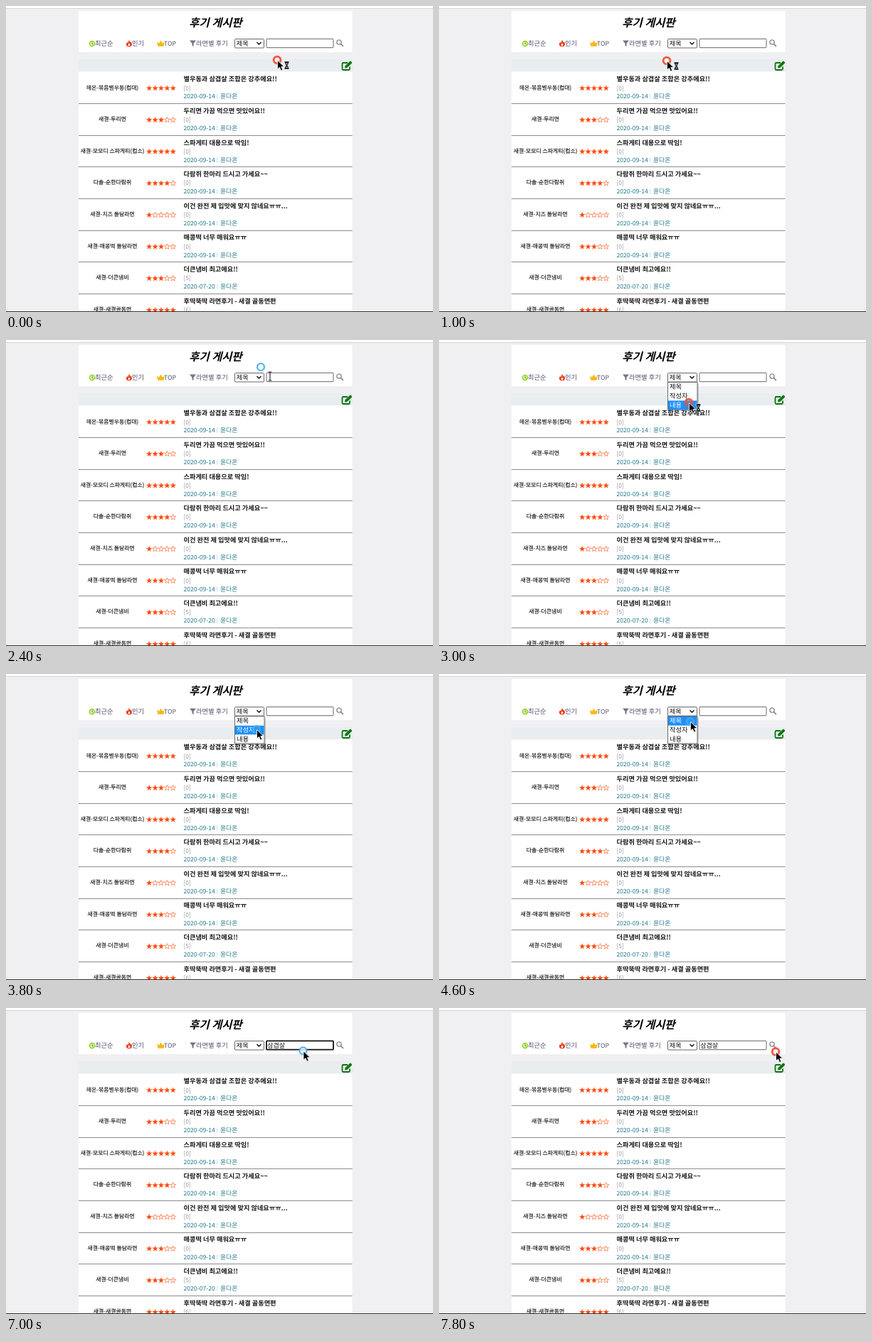
These frames come from a looping animation (600x431 px, 8 s). An HTML page:

```html
<!DOCTYPE html>
<html>
<head>
<meta charset="utf-8">
<title>후기 게시판</title>
<style>
  html, body { margin: 0; width: 100%; height: 100%; overflow: hidden; background: #f0eff1; }
  svg { display: block; width: 100%; height: 100%; }
  text { font-family: "Noto Sans CJK KR", "Noto Sans CJK", "Noto Sans", sans-serif; white-space: pre; text-rendering: geometricPrecision; }
  .subject { font-weight: 700; fill: #161616; }
  .count { fill: #999; }
  .meta { fill: #21788c; }
  .label { fill: #111; stroke: #111; stroke-width: .12; text-anchor: middle; }
  .menu { fill: #514d6e; }
  .heading { font-weight: 700; font-style: italic; fill: #000; text-anchor: middle; }
</style>
</head>
<body>
<svg id="stage" viewBox="0 0 600 431"></svg>
<script>
const LOOP = 8000, STEP = 200;
const ROW_TOP = 92.4, ROW_HEIGHT = 44.65;
const AUTHOR = '윤다온';

// label, stars, subject, replies, date
const reviews = [
  ['해온-볶음별우동(컵대)', 5, '별우동과 삼겹살 조합은 강추에요!!', 0, '2020-09-14'],
  ['새결-두리면', 3, '두리면 가끔 먹으면 맛있어요!!', 0, '2020-09-14'],
  ['새결-모모디 스파게티(컵소)', 5, '스파게티 대용으로 딱임!', 0, '2020-09-14'],
  ['다솔-순한다람쥐', 4, '다람쥐 한마리 드시고 가세요~~', 0, '2020-09-14'],
  ['새결-치즈 돌담라면', 1, '이건 완전 제 입맛에 맞지 않네요ㅠㅠ...', 0, '2020-09-14'],
  ['새결-매콩떡 돌담라면', 3, '매콩떡 너무 매워요ㅠㅠ', 0, '2020-09-14'],
  ['새결-더큰냄비', 3, '더큰냄비 최고에요!!', 5, '2020-07-20'],
  ['새결-새결골동면', 5, '후딱뚝딱 라면후기 - 새결 골동면편', 6, '2020-07-20']
];
const options = ['제목', '작성자', '내용'];

// Pointer hot spot: time, x, y
const path = [
  [0, 381, 76], [1000, 320, 77], [1400, 326, 71], [2000, 391, 54],
  [2200, 388, 49], [2600, 354, 53], [3000, 351, 88], [3400, 351, 88],
  [3800, 352, 78], [4600, 353, 67], [5000, 376, 56], [5200, 383, 56.5],
  [6800, 383, 56.5], [7200, 452, 64], [7400, 526, 74], [7800, 473, 61.5]
];

// Time, committed text, syllable being composed
const typing = [
  [0, '', ''], [5400, '', 'ㅅ'], [5600, '', '사'], [5800, '', '삼'], [6000, '삼', '겨'],
  [6200, '삼', '겹'], [6400, '삼겹', '사'], [6600, '삼겹', '살'], [7000, '삼겹살', '']
];

const rect = (x, y, w, h, fill, extra = '') =>
  `<rect x="${x}" y="${y}" width="${w}" height="${h}" fill="${fill}" ${extra}/>`;
const shape = (d, fill, extra = '') => `<path d="${d}" fill="${fill}" ${extra}/>`;
const text = (x, centerY, size, content, attrs) =>
  `<text x="${x}" y="${centerY + size * .37}" font-size="${size}" ${attrs}>${content}</text>`;

function star(cx, cy, filled) {
  const points = Array.from({ length: 10 }, (_, i) => {
    const radius = i % 2 ? 1.7 : 4.1, angle = (i / 5 - .5) * Math.PI;
    return `${(cx + radius * Math.cos(angle)).toFixed(2)},${(cy + radius * Math.sin(angle)).toFixed(2)}`;
  });
  return `<polygon points="${points.join(' ')}" fill="${filled ? '#ff4a0c' : 'none'}" stroke="#ff4a0c" stroke-width="${filled ? .2 : .6}"/>`;
}

function reviewRow([label, score, subject, replies, date], index) {
  const y = ROW_TOP + index * ROW_HEIGHT;
  const stars = [0, 1, 2, 3, 4].map(i => star(201.2 + i * 8.4, y + 23.4, i < score)).join('');
  return text(149.5, y + 22.2, 7.9, label, 'class="label"') + stars
    + text(249.5, y + 10.4, 9.2, subject, 'class="subject"')
    + text(249.5, y + 23, 8.4, `[${replies}]`, 'class="count"')
    + text(249.5, y + 34.8, 8.65, date, 'class="meta"')
    + rect(296.5, y + 31.5, .7, 7, '#b5ccd3')
    + text(301, y + 34.8, 8.8, AUTHOR, 'class="meta"')
    + rect(102, Math.round(y + ROW_HEIGHT), 384.5, 1, '#8d8d8d');
}

const menu = [[125, '최근순'], [177, '인기'], [222, 'TOP'], [267, '라면별 후기']]
  .map(([x, label]) => text(x, 52.5, label === 'TOP' ? 8.7 : 9.3, label, 'class="menu"')).join('');

const icons =
  '<circle cx="121" cy="53" r="3.6" fill="#d9f2a0" stroke="#86cc1c" stroke-width="1.3"/>'
  + shape('M121 50.8v2.4l1.6 1', 'none', 'stroke="#5ea30c"')
  + shape('M172.5 48c2 1.5 2 2.5 2.4 3.4l1-1c2.4 3.8.8 6.9-2.9 6.9s-5.5-3.4-2.9-6.4l.9 1.1c1-1 1.5-2.4 1.5-4z', '#ee3d16')
  + shape('M173 52.5c1.6 1.5 2 3.5 0 3.8-2-.2-1.6-2.2 0-3.8z', '#fff')
  + shape('M212 50.5l3 2 2.5-3.9 2.5 3.9 3-2-1.4 6.3h-8.2z', '#f7b916')
  + shape('M258 48.5h9l-3.5 4.2v4.3l-2-1.3v-3z', '#6d7685')
  + shape('M470.3 53.3l3.6 3.6', 'none', 'stroke="#8d8d8d" stroke-width="1.9"')
  + '<circle cx="468" cy="51" r="3.1" fill="none" stroke="#8d8d8d" stroke-width="1.4"/>'
  + shape('M480 80h-6q-1.5 0-1.5 1.5v7q0 1.5 1.5 1.5h7.5q1.5 0 1.5-1.5v-3', 'none', 'stroke="#0c750c" stroke-width="1.8"')
  + shape('M476 87.6l.6-3.3 6.4-6.4q.8-.6 1.6 0l1.2 1.2q.6.8 0 1.6l-6.5 6.4z', '#0c750c');

const dropdown = '<g id="dropdown">'
  + rect(322, 61, 43, 39, '#000', 'opacity=".15"')
  + rect(321.5, 59.5, 41.5, 38.5, '#fff', 'stroke="#666"')
  + rect(322, 60, 40.5, 12.6, '#1e90ff', 'id="highlight"')
  + options.map((label, i) => text(324, 66 + i * 12.7, 9.3, label, 'class="option"')).join('') + '</g>';

const pointer =
  '<g id="ring"><circle id="glow" r="6.6" opacity=".35"/><circle id="band" r="4.8" fill="#fff"/></g>'
  + `<g id="arrow">${shape('M0 0v12.5l3-2.7 2 4.7 2.3-1-2-4.5h4z', '#000', 'stroke="#fff" stroke-width=".8"')}`
  + `<g id="hourglass">${shape('M9.5 1.5h7v1.8h-.8q0 2.2-1.8 3.7 1.8 1.5 1.8 3.7h.8v1.8h-7v-1.8h.8q0-2.2 1.8-3.7-1.8-1.5-1.8-3.7h-.8z', '#000', 'stroke="#fff" stroke-width=".6"')}`
  + `${shape('M11.5 4h3l-1.5 2zM11.5 10.5l1.5-2 1.5 2z', '#ddd')}</g></g>`
  + `<g id="beam">${shape('M-2.5-6h5M0-6v12M-2.5 6h5', 'none', 'stroke="#222" stroke-width="1.1"')}</g>`;

document.getElementById('stage').innerHTML =
  rect(0, 0, 600, 431, '#f0eff1') + rect(0, 0, 600, 3, '#fff') + rect(0, 3, 600, 1, '#d4d3d6')
  + rect(102, 7, 384.5, 58, '#fff') + rect(102, 75, 384.5, 17.4, '#e9edf0')
  + rect(102, 92.4, 384.5, 338, '#fff')
  + text(294.5, 23.8, 15.4, '후기 게시판', 'class="heading"')
  + menu + icons
  + rect(321.5, 46.5, 41, 12.5, '#fff', 'stroke="#666" rx="1"')
  + text(323.8, 52.5, 9.2, '제목', 'fill="#111"')
  + shape('M352.5 51l3 3 3-3', 'none', 'stroke="#111" stroke-width="1.5"')
  + rect(366, 46.3, 94, 12.4, '#fff', 'id="field" rx="1"')
  + rect(0, 47.5, 0, 10.2, '#1e7fd8', 'id="composing"')
  + text(367.3, 52.5, 9, '<tspan id="typed"></tspan><tspan id="syllable"></tspan>', 'fill="#111"')
  + reviews.map(reviewRow).join('')
  + rect(0, 430, 600, 1, '#333')
  + dropdown + pointer;

const el = id => document.getElementById(id);
const show = (id, visible) => el(id).setAttribute('visibility', visible ? 'inherit' : 'hidden');
const place = (id, x, y) => el(id).setAttribute('transform', `translate(${x} ${y})`);
const set = (id, attrs) => Object.entries(attrs).forEach(([key, value]) => el(id).setAttribute(key, value));

function pointerAt(time) {
  const next = path.findIndex(key => key[0] > time);
  if (next < 0) return path[path.length - 1].slice(1);
  const [t0, x0, y0] = path[next - 1], [t1, x1, y1] = path[next];
  const p = (time - t0) / (t1 - t0), eased = p * p * (3 - 2 * p);
  return [x0 + (x1 - x0) * eased, y0 + (y1 - y0) * eased];
}

function render(time) {
  const [x, y] = pointerAt(time);
  const overField = x > 365 && x < 461 && y > 46 && y < 60;
  const pressed = time <= 1200 || (time >= 2600 && time <= 3600)
    || (time >= 5200 && time < 7000) || time >= 7600;
  const open = time >= 2600 && time < 4800;
  const focused = time >= 5200 && time < 7600;

  // The text cursor is drawn from its corner, so the ring sits up and left of it.
  const offset = overField ? 13 : 0;
  place('ring', x - offset, y - offset);
  place('arrow', x + .5, y + .5);
  place('beam', x, y);
  show('arrow', !overField);
  show('beam', overField);
  show('hourglass', !overField && pressed && time < 4000);
  const color = pressed ? '#f2523a' : '#45aee8';
  set('glow', { fill: color });
  set('band', { stroke: color, 'stroke-width': pressed ? 2.5 : 1.8, 'fill-opacity': open ? 0 : .75 });

  show('dropdown', open);
  const chosen = Math.max(0, Math.min(2, Math.floor((y - 59.5) / 12.7)));
  set('highlight', { y: 60 + chosen * 12.7 });
  document.querySelectorAll('.option').forEach((option, i) =>
    option.setAttribute('fill', i === chosen ? '#fff' : '#111'));

  set('field', { stroke: focused ? '#111' : '#666', 'stroke-width': focused ? 1.8 : 1 });
  const [, committed, syllable] = typing.filter(key => key[0] <= time).pop();
  el('typed').textContent = committed;
  el('syllable').textContent = syllable;
  set('syllable', { fill: syllable ? '#fff' : '#111' });
  set('composing', { x: 367 + committed.length * 8.28, width: syllable ? 8.2 : 0 });
}

const start = performance.now();
function tick() {
  const time = (performance.now() - start) % LOOP;
  render(Math.floor(time / STEP) * STEP);
  requestAnimationFrame(tick);
}
tick();
</script>
</body>
</html>
```
